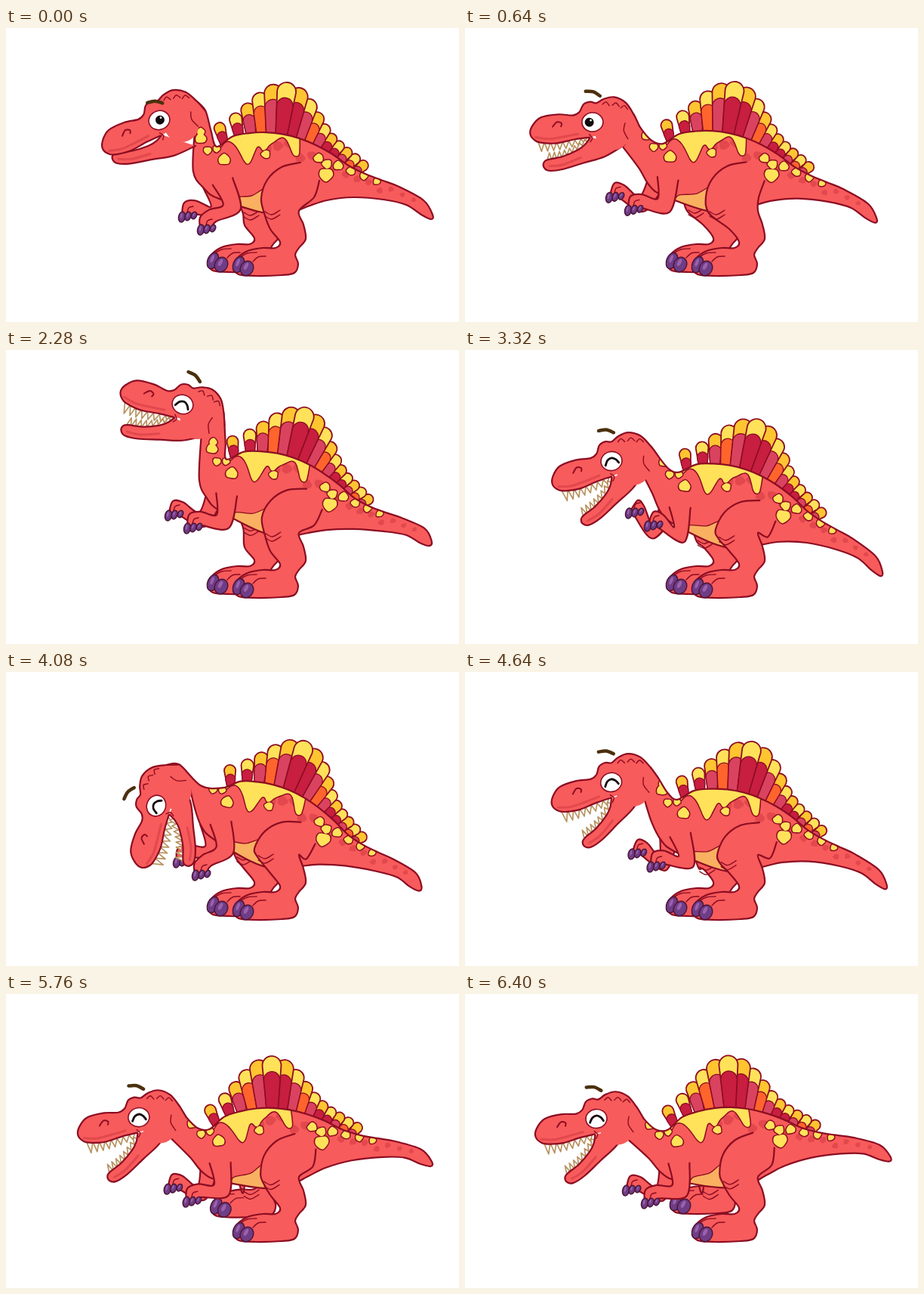
Animation, 600 px wide and 389 px high, one loop 6440 ms. Source, as an HTML page with a canvas:

```html
<!DOCTYPE html>
<html lang="en">
<head>
<meta charset="utf-8">
<title>Laughing dinosaur</title>
<style>
html, body { margin: 0; width: 100%; height: 100%; overflow: hidden; background: #fff; }
canvas { display: block; width: 600px; height: 389px; }
</style>
</head>
<body>
<canvas id="stage"></canvas>
<script>
const W = 600, H = 389, LOOP = 6440, STEP = 40, CLOSE_EYES = 1840;
const canvas = document.getElementById('stage');
const ratio = window.devicePixelRatio || 1;
canvas.width = W * ratio;
canvas.height = H * ratio;
const g = canvas.getContext('2d');

const INK = '#8c0d22', SKIN = '#f75b5b', DARK = '#e2484d', YELLOW = '#ffe259', GOLD = '#ffc531',
  ORANGE = '#ff642d', CRIMSON = '#c81e40', ROSE = '#da4360', BELLY = '#f9b060',
  CLAW = '#6f3c86', SHINE = '#9a62ad', TOOTH = '#b8925f', BROW = '#4b300d';

const rad = d => d * Math.PI / 180;
const mix = (a, b, k) => a + (b - a) * k;
const clamp = k => Math.max(0, Math.min(1, k));
const ease = k => (1 - Math.cos(Math.PI * clamp(k))) / 2;
const bump = (x, mid, width) => Math.exp(-(((x - mid) / width) ** 2));
const pts = s => s.trim().split(/\s+/).map(p => p.split(',').map(Number));
const shift = (list, dx, dy) => list.map(([x, y]) => [x + dx, y + dy]);

function seeded(seed) {
  return () => (seed = (seed * 16807) % 2147483647) / 2147483647;
}

// body: x, y, turn, tail bend; head: x, y, nod, jaw; hand: x, y
const key = (t, body, head, hand) => ({ t, body, head, hand });
const KEYS = [
  key(0, [289, 174, 0, 0], [203, 122, -18.7, -26], [264, 258]),
  key(1320, [268, 170, 2, 0], [163, 125, 0, 0], [215, 229]),
  key(2280, [299, 163, 9.5, -28], [234, 72, 20, 0], [246, 227]),
  key(3320, [291, 180, 8.6, 0], [194, 147, -13, 12], [248, 224]),
  key(4080, [293, 172, 13, -22], [199, 177, -68, 10], [257, 260]),
  key(5120, [290, 188, 4.4, 0], [194, 145, -10, 15], [252, 249]),
  key(6400, [281, 195, -8.8, -10], [174, 165, -7.7, 18], [244, 268])
];

// Eases between key poses; sways and bobs with laughter on the way
function poseAt(t) {
  let i = 0;
  while (i < KEYS.length - 2 && KEYS[i + 1].t <= t) i++;
  const a = KEYS[i], b = KEYS[i + 1];
  const k = clamp((t - a.t) / (b.t - a.t));
  const sway = 12 / (i + 1) * Math.sin(2 * Math.PI * k);
  const bob = -10 * Math.sin(2 * Math.PI * k) ** 2;
  const part = n => {
    const [x, y, ...rest] = a[n].map((v, j) => mix(v, b[n][j], ease(k * 1.6)));
    return [x + sway, y + bob, ...rest];
  };
  return { body: part('body'), head: part('head'), hand: part('hand') };
}

function spin([x, y], deg, ox, oy) {
  const c = Math.cos(rad(deg)), s = Math.sin(rad(deg));
  return [ox + x * c - y * s, oy + x * s + y * c];
}

// Smooth curve through the points
function curve(p, closed) {
  const path = new Path2D(), n = p.length;
  const at = i => closed ? p[(i + n) % n] : p[Math.max(0, Math.min(n - 1, i))];
  path.moveTo(...p[0]);
  for (let i = 0; i < (closed ? n : n - 1); i++) {
    const [a, b, c, d] = [at(i - 1), at(i), at(i + 1), at(i + 2)];
    path.bezierCurveTo(b[0] + (c[0] - a[0]) / 6, b[1] + (c[1] - a[1]) / 6,
      c[0] - (d[0] - b[0]) / 6, c[1] - (d[1] - b[1]) / 6, c[0], c[1]);
  }
  return path;
}

function paint(path, fill, line = INK, width = 2.2) {
  if (fill) { g.fillStyle = fill; g.fill(path); }
  if (line) { g.strokeStyle = line; g.lineWidth = width; g.stroke(path); }
}

const crease = (p, width = 1.4) => paint(curve(p), null, INK, width);

function oval(x, y, rx, ry, deg, fill, line, width) {
  const path = new Path2D();
  path.ellipse(x, y, rx, ry, rad(deg), 0, 7);
  paint(path, fill, line, width);
}

function claw(x, y, rx, ry, deg) {
  oval(x, y, rx, ry, deg, CLAW, '#4d1537', 1.5);
  const [sx, sy] = spin([-rx * 0.25, -ry * 0.2], deg, x, y);
  oval(sx, sy, rx * 0.28, ry * 0.5, deg, SHINE, null);
}

// Height of the back line at x, in body space
const spine = x => x < 460 ? 138 + 0.0034 * (x - 340) ** 2 : 187 + 0.38 * (x - 460);

const PETALS = 15, PEAK = 4.6;
const TINTS = [ORANGE, ROSE, CRIMSON, CRIMSON, ROSE];

function petal(len, r, tip) {
  const s = new Path2D();
  s.moveTo(0, -r * 0.55);
  s.lineTo(len, -tip);
  s.arc(len, 0, tip, -Math.PI / 2, Math.PI / 2);
  s.lineTo(0, r * 0.55);
  s.closePath();
  return s;
}

function sail(body, turn) {
  const order = [...Array(PETALS).keys()].sort((a, b) => Math.abs(b - PEAK) - Math.abs(a - PEAK));
  for (const i of order) {
    const u = i / (PETALS - 1), size = bump(u, 0.36, 0.24);
    const x = 290 + 168 * u ** 0.8, r = 7 + 5.5 * size, len = 20 + 46 * size;
    g.save();
    g.translate(...body([x, spine(x) + 10]));
    g.rotate(rad(turn - 106 + 64 * u));
    paint(petal(len, r, r), i % 2 ? YELLOW : GOLD, INK, 1.8);
    paint(petal(len - r * 1.5, r, r * 0.86), TINTS[(i + 2) % TINTS.length], INK, 1.3);
    g.restore();
  }
}

function blob([x, y, r]) {
  const p = [];
  for (let a = 0; a < 6; a += Math.PI / 4) {
    const q = r * (1 + 0.12 * Math.sin(3 * a + x));
    p.push([x + q * Math.cos(a), y + q * Math.sin(a) * 0.92]);
  }
  return p;
}

// Yellow patch along the back with drips on its lower edge
function saddle() {
  const top = [], low = [];
  for (let x = 284; x <= 390; x += 4) {
    const drip = 9 + 5 * Math.sin(x / 6) + 32 * bump(x, 322, 11) + 12 * bump(x, 341, 6) + 12 * bump(x, 382, 7);
    top.push([x, spine(x) - 3]);
    low.unshift([x, spine(x) + drip]);
  }
  return [...top, ...low];
}

const SPOTS = pts('289,174,7.5 279,160,4.5 267,162,5 344,167,5.5 424,194,9 414,172,6 425,180,6 258,137,5 258,146,7');
for (let i = 0; i < 4; i++) SPOTS.push([440 + 17 * i, 182 + 7 * i, 6 - 0.6 * i]);
const LIGHT = [saddle(), ...SPOTS.map(blob)];

const random = seeded(11), DIM = [];
for (let x = 330; x < 545; x += 15) {
  const size = mix(7.5, 3, (x - 330) / 215);
  DIM.push(blob([x, spine(x) + size * (1.5 + 3 * random()), size]));
}

const TAIL_AND_BELLY = pts(`553,228 565,247 563,253 550,247 530,234 500,227 460,224 425,228 400,236
  370,246 335,243 280,225 262,212 248,190`);

function trunk(body, head) {
  const nape = head([62, 8]), base = body([279, 157]);
  const sag = [(nape[0] + base[0]) / 2, (nape[1] + base[1]) / 2 + 0.22 * Math.abs(base[0] - nape[0])];
  const back = [];
  for (let x = 300; x < 530; x += 22) back.push(body([x, spine(x)]));
  const path = curve([head([55, -8]), nape, sag, base, ...back, ...TAIL_AND_BELLY.map(body), head([38, 33])]);
  paint(path, SKIN, null);
  g.save();
  g.clip(path);
  for (const p of DIM) paint(curve(p.map(body), true), DARK, null);
  paint(curve(pts('301,225 325,222 350,212 372,246 335,256 300,240').map(body), true), BELLY, INK, 1.3);
  const patches = LIGHT.map(p => curve(p.map(body), true));
  for (const p of patches) paint(p, null, INK, 3);
  for (const p of patches) paint(p, YELLOW, null);
  g.restore();
  paint(path, null);
}

const SHIN_AND_FOOT = pts(`350,266 363,283 357,291 340,291 320,295 306,305 302,317 308,326 330,328
  365,327 382,324 387,312 383,300 388,291 397,279 394,260 388,242`);

function leg(front, rear, dx, dy) {
  const foot = p => shift(p, dx, dy);
  paint(curve([...front, ...foot(SHIN_AND_FOOT), ...rear]), SKIN);
  const [x, y] = front[front.length - 1];
  for (const d of [0, 6]) crease([[x + 1, y - 2 + d], [x + 10, y + 2 + d], [x + 21, y - 4 + d]]);
  crease(foot(pts('310,303 320,298 332,297')));
  crease(foot(pts('327,309 334,303 344,302')));
  const [[ax, ay], [bx, by]] = foot(pts('308,313 319,318'));
  claw(ax, ay, 7, 11, 22);
  claw(bx, by, 8.5, 10, 28);
}

function farLeg(body, lift) {
  const hip = body([308, 230]);
  leg([hip, [hip[0] + 6, hip[1] + 16]], [body([350, 236])], -34 + 5 * lift, -5 - 32 * lift);
}

function nearLeg(body) {
  const thigh = pts('390,178 365,184 346,201 338,225').map(body);
  const [x, y] = thigh[3];
  leg([...thigh, [x + 4, Math.max(y + 12, 245)]], pts('408,224 415,202').map(body), 0, 0);
}

// Elbow of a two-bone arm
function elbowOf([x, y], [hx, hy], upper, fore) {
  const dx = hx - x, dy = hy - y, gap = Math.hypot(dx, dy);
  const d = Math.min(gap, upper + fore - 1);
  const along = (upper ** 2 - fore ** 2 + d ** 2) / (2 * d);
  const out = Math.sqrt(Math.max(0, upper ** 2 - along ** 2));
  return [x + (dx * along + dy * out) / gap, y + (dy * along - dx * out) / gap];
}

function arm(root, hand, thick) {
  const elbow = elbowOf(root, hand, 36, 41);
  const wrist = [mix(elbow[0], hand[0], 0.72), mix(elbow[1], hand[1], 0.72) - 4];
  const line = [root, elbow, wrist, hand], left = [], right = [];
  const widths = [thick, thick * 0.85, 9, 10];
  line.forEach(([x, y], i) => {
    const a = line[Math.max(0, i - 1)], b = line[Math.min(3, i + 1)];
    const len = Math.hypot(b[0] - a[0], b[1] - a[1]) || 1;
    const nx = (b[1] - a[1]) / len * widths[i], ny = (a[0] - b[0]) / len * widths[i];
    left.push([x + nx, y + ny]);
    right.unshift([x - nx, y - ny]);
  });
  const [x, y] = hand;
  paint(curve([...left, [x - 5, y + 8], ...right]), SKIN);
  crease([[x + 1, y + 3], [x + 3, y - 3], [x + 9, y - 5]]);
  for (let i = 0; i < 3; i++) claw(x - 6 + 8 * i, y + 9 - i, 4.4 - 0.5 * i, 7 - i, 12 + 8 * i);
}

const SKULL = pts(`62,8 55,-8 45,-24 30,-32 16,-30 6,-25 -2,-27 -11,-24 -17,-14 -26,-10 -45,-12 -68,-9
  -80,2 -83,13 -76,22 -66,25 -48,26 -25,22 -5,20`);
const JAW = pts('-4,20 -10,29 -20,37 -40,46 -58,50 -64,53 -65,60 -58,65 -40,63 -12,54 16,45 42,29');

// Zigzag row between two points; bigger fangs in front
function teeth([x1, y1], [x2, y2], bow, depth) {
  const path = new Path2D(), count = 16;
  path.moveTo(x1, y1);
  for (let i = 1; i <= count; i++) {
    const k = i / count;
    const y = mix(y1, y2, k) + bow * Math.sin(Math.PI * k);
    path.lineTo(mix(x1, x2, k), y + (i % 2 ? depth * (1 - 0.55 * k) : 0));
  }
  paint(path, '#fff', TOOTH, 1.7);
}

function face([x, y, nod, jaw], grin, shut) {
  g.save();
  g.translate(x, y);
  g.rotate(rad(nod));

  if (grin > 0.1) teeth([-73, 23], [-8, 20], 3, 15 * grin);
  g.save();
  g.translate(-2, 22);
  g.rotate(rad(-jaw));
  g.translate(2, -22);
  if (grin > 0.1) teeth([-61, 53], [-8, 26], 5, -13 * grin);
  paint(curve(JAW), SKIN);
  paint(curve(pts('-57,59 -40,57 -16,47')), null, DARK, 3);
  g.restore();

  const skull = curve(SKULL);
  oval(26, 15, 23, 23, 0, SKIN, null);
  paint(skull, SKIN, null);
  paint(curve(pts('-76,17 -60,20 -40,18 -20,15')), null, DARK, 3);
  paint(skull, null);
  for (const bx of [14, 27, 38]) {
    const by = -23 + (bx - 14) ** 2 / 100;
    crease([[bx, by], [bx + 5, by - 3], [bx + 9, by + 2]]);
  }
  crease(pts('-53,4 -47,-2 -41,0 -42,4'), 2);
  crease(pts('43,3 41,13 46,24'));
  crease(pts('-5,16 -1,21 -4,26'));

  oval(0, 0, 14, 12.5, 0, '#fff', INK, 1.6);
  if (shut) {
    paint(curve(pts('-9,4 -5,-2 1,-4 6,-1 9,4')), null, '#16090b', 2.8);
  } else {
    const look = 1 - 6 * grin;
    oval(look, 0, 6, 6, 0, '#100b0c', null);
    oval(look + 2, -2.5, 1.4, 1.4, 0, '#fff', null);
  }
  g.translate(2, -24 - 16 * grin);
  g.rotate(rad(17));
  paint(curve(pts('-10,0 0,-2 10,1')), null, BROW, 4.5);
  g.restore();
}

function draw(t) {
  const p = poseAt(t);
  const [bx, by, turn, tail] = p.body, [hx, hy, nod, jaw] = p.head, [nx, ny] = p.hand;
  const body = ([x, y]) => {
    const bend = tail * Math.max(0, (x - 400) / 165) ** 2;
    return spin([x - 289, y - 174 + bend], turn, bx, by);
  };
  const head = q => spin(q, nod, hx, hy);

  g.setTransform(ratio, 0, 0, ratio, 0, 0);
  g.fillStyle = '#fff';
  g.fillRect(0, 0, W, H);
  g.lineCap = g.lineJoin = 'round';

  farLeg(body, clamp(-turn / 8.8));
  arm(body([272, 207]), [nx - 25, ny - 17], 12);
  sail(body, turn);
  trunk(body, head);
  nearLeg(body);
  arm(body([287, 203]), [nx, ny], 14);
  face(p.head, clamp((jaw + 26) / 26), t >= CLOSE_EYES);
}

let start;
function tick(now) {
  if (start === undefined) start = now;
  draw(Math.floor(((now - start) % LOOP) / STEP) * STEP);
  requestAnimationFrame(tick);
}
draw(0);
requestAnimationFrame(tick);
</script>
</body>
</html>
```
